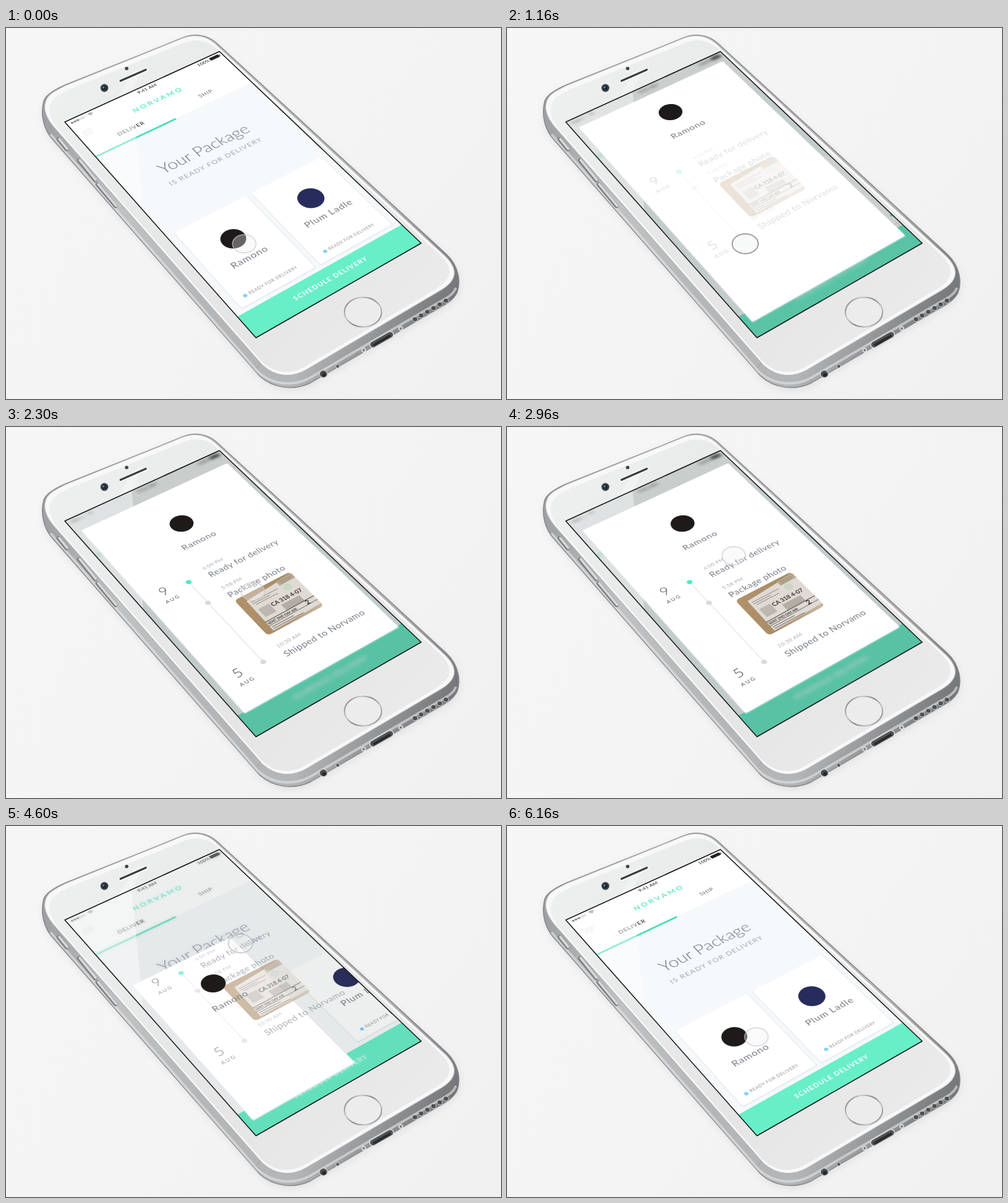
An HTML page for the animation above (6180 ms loop, 800 by 600 pixels).

```html
<!DOCTYPE html>
<html lang="en">
<head>
<meta charset="utf-8">
<title>Delivery app</title>
<style>
html, body { margin: 0; width: 100%; height: 100%; overflow: hidden; background: #f3f3f3; }
#stage { position: relative; width: 800px; height: 600px; overflow: hidden; }
#stage > svg { position: absolute; left: 0; top: 0; }
#screen { position: absolute; left: 0; top: 0; width: 375px; height: 667px; overflow: hidden; transform-origin: 0 0; background: #fff; }
#screen svg { display: block; }
#haze { filter: blur(4px); }
text { font-family: Lato, "Open Sans", sans-serif; white-space: pre; }
</style>
</head>
<body>
<div id="stage">
  <svg id="phone" width="800" height="600" viewBox="0 0 800 600"></svg>
  <div id="screen"><svg id="ui" width="375" height="667" viewBox="0 0 375 667"></svg></div>
  <svg id="top" width="800" height="600" viewBox="0 0 800 600"></svg>
</div>
<script>
const LOOP = 6180, STEP = 20, W = 375, H = 667;
const CORNERS = [[95, 152], [345, 38], [671, 348], [404, 501]];
const $ = id => document.getElementById(id);
const clamp = v => Math.min(1, Math.max(0, v));
const mix = (a, b, p) => a + (b - a) * p;
const ramp = (t, from, len) => clamp((t - from) / len);
const range = n => [...Array(n).keys()];

// ---------- markup helpers ----------
const rect = (x, y, w, h, fill, more = '') =>
  `<rect x="${x}" y="${y}" width="${w}" height="${h}" fill="${fill}" ${more}/>`;
const dot = (x, y, r, fill, more = '') =>
  `<circle cx="${x}" cy="${y}" r="${r}" fill="${fill}" ${more}/>`;
const line = (x1, y1, x2, y2, color, width, more = '') =>
  `<path d="M${x1} ${y1}L${x2} ${y2}" stroke="${color}" stroke-width="${width}" fill="none" ${more}/>`;
// y is the middle of the capitals
const label = (x, y, size, fill, str, { ls = 0, at = 'middle', wt = 400 } = {}) =>
  `<text x="${at === 'middle' ? x + ls / 2 : x}" y="${y + size * .36}" font-size="${size}" fill="${fill}" ` +
  `letter-spacing="${ls}" text-anchor="${at}" font-weight="${wt}">${str}</text>`;
const gradient = (id, x1, y1, x2, y2, ...stops) =>
  `<linearGradient id="${id}" gradientUnits="userSpaceOnUse" x1="${x1}" y1="${y1}" x2="${x2}" y2="${y2}">` +
  stops.map((c, i) => `<stop offset="${i / (stops.length - 1)}" stop-color="${c}"/>`).join('') + '</linearGradient>';

// ---------- phone body ----------
const BODY = 'M61 118C65 107 80 99 96 92L285 16C305 8 325 11 340 24L712 366C733 386 735 412 729 428C723 440 712 446 700 453L492 574C465 587 432 583 410 563L76 181C61 165 55 140 61 118Z';
const FACE = 'M65 116C69 106 82 100 96 93L285 16.500C305 9 323 12 338 25L709 368C733 391 728 409 703 424L485 553C460 567 435 564 414 545L77 160C62 142 60 127 65 116Z';

function drawPhone() {
  const cap = 'stroke-linecap="round"';
  const button = (x1, y1, x2, y2) =>
    line(x1, y1, x2, y2, '#7b7d80', 6.5, cap) + line(x1 + 1, y1 - .5, x2 + 1, y2 - .5, '#d6d8da', 3.8, cap);
  const holes = range(6).map(i =>
    `<ellipse cx="${661 + i * 10}" cy="${471 - i * 6}" rx="4.200" ry="3.800" fill="#4d4f52" stroke="#d3d4d6"/>`).join('');
  const screw = (x, y) => dot(x, y, 3.4, '#b6b8ba', 'stroke="#eee"') + dot(x, y, 1.4, '#67696c');

  $('phone').innerHTML = `<defs>
    ${gradient('wall', 0, 0, 800, 600, '#f6f6f6', '#f4f4f4', '#f0f0f0')}
    ${gradient('metal', 60, 120, 730, 470, '#9b9da0', '#bfc1c3', '#b4b6b8', '#b3b5b7', '#6b6d70')}
    ${gradient('bezel', 100, 60, 650, 520, '#eeefef', '#e7e8e8', '#e5e5e6', '#ebebeb')}
    ${gradient('ring', 548, 440, 606, 480, '#77797b', '#c9cacb', '#85878a', '#c4c5c6', '#7d7f82')}
    <filter id="soft" x="-20%" y="-20%" width="140%" height="140%"><feGaussianBlur stdDeviation="6"/></filter></defs>
    ${rect(0, 0, 800, 600, 'url(#wall)')}
    <path d="${BODY}" fill="#77797c" opacity=".15" transform="translate(1 4)" filter="url(#soft)"/>
    <path d="${BODY}" fill="url(#metal)" stroke="#85878a" stroke-width="1.400"/>
    <path d="M72 172L407 556C433 579 466 579 491 566L699 444C714 436 724 430 727 420" fill="none" stroke="#e6e7e8" stroke-width="4" opacity=".6"/>
    ${button(85, 180, 98, 196)}${button(118, 214, 144, 246)}${button(148, 253, 177, 288)}
    ${line(66, 147, 73, 155, '#9fa1a4', 2)}${line(405, 550, 411, 542, '#a9abad', 2)}
    <path d="${FACE}" fill="#f8f8f8" stroke="#b3b5b7" stroke-width="1.200"/>
    <path d="${FACE}" fill="url(#bezel)" transform="translate(396 290) scale(.976) translate(-396 -289)"/>
    <path d="M181 113L204 102L222 64L205 71Z" fill="#fff" opacity=".28"/>
    ${line(185, 86, 226, 68, '#fff', 5.5, cap)}${line(185, 85.5, 226, 67.500, '#3b3c3e', 3.2, cap)}
    ${dot(195, 65.5, 2.8, '#404247')}
    ${dot(159, 97, 6.4, '#42464b')}${dot(159, 97, 4, '#1b2936')}${dot(157.6, 96, 1.6, '#5d86ad')}
    <ellipse cx="577" cy="459.500" rx="30" ry="24" fill="#ececec" stroke="url(#ring)" stroke-width="2.200"/>
    <ellipse cx="513" cy="559.500" rx="6.500" ry="6" fill="#4a4c4f" stroke="#d4d5d6" stroke-width="1.200"/>
    ${dot(514, 561, 3, '#26272a')}${dot(536, 547, 3, '#55575a', 'stroke="#d2d3d4"')}
    ${screw(578, 521)}${screw(638, 486)}
    ${line(593, 512, 621, 496, '#dcddde', 12, cap)}${line(593, 512, 621, 496, '#505255', 9, cap)}
    ${line(595, 512.5, 620, 498, '#2a2b2d', 4, cap)}${holes}`;
}

// ---------- app screens ----------
const INK = '#777c86', PALE = '#a6aab3', TEAL = '#62eac5';
const NAME = { ls: 1.1 };
const READY = { ls: .8, at: 'start' };
const ready = x => dot(x, 579, 4, '#86d3ef') + label(x + 8.5, 579, 9, '#8b8f98', 'READY FOR DELIVERY', READY);

function statusBar() {
  const signal = range(5).map(i =>
    dot(11 + i * 6.5, 10.5, 2.5, i < 3 ? '#333' : 'none', 'stroke="#333" stroke-width=".700"')).join('');
  const wifi = [2, 5, 8].map(r =>
    `<path d="M${54 - r * .7} ${14 - r * .7}A${r} ${r} 0 0 1 ${54 + r * .7} ${14 - r * .7}" stroke="#333" stroke-width="1.700" fill="none"/>`).join('');
  return signal + wifi + label(187, 10.5, 12, '#222', '9:41 AM') +
    label(327, 10.5, 12, '#222', '100%') + rect(344, 5.5, 23, 9, '#222', 'rx="1.500"') + rect(368, 8, 1.8, 4, '#222');
}

function photo() {
  const g = '#8e8880';
  const rows = [[176, 400, 62], [176, 405, 40], [180, 410, 52], [250, 387, 30], [252, 392, 25]]
    .map(([x, y, w]) => rect(x, y, w, 2, g, 'opacity=".700"')).join('');
  return `<g id="photo" clip-path="url(#frame)">
    ${rect(153, 378, 131, 110, 'url(#card)')}
    <path d="M171 393L284 383V480L169 484Z" fill="#dfdad4"/>
    <path d="M246 384L284 382V396L246 397Z" fill="#b9a88e"/>
    ${rows}${dot(257, 408, 9, '#cbd6c6')}
    ${rect(177, 423, 25, 25, '#bdb7af')}${rect(219, 439, 43, 17, '#b3ada5')}
    ${label(239, 430, 12.5, '#37332f', 'CA 318 4-07', { wt: 700 })}
    ${line(169, 458, 284, 456, '#4a4540', 1.6)}${line(169, 470, 284, 468, '#4a4540', 1.2)}
    ${label(204, 464, 7.500, '#37332f', 'SENT 2ND DAY AIR', { wt: 700 })}
    ${label(264, 463, 15, '#2f2b28', '2', { wt: 700 })}
    ${rect(172, 474, 50, 2, g)}${rect(172, 479, 70, 2, g)}</g>`;
}

const START = { at: 'start', ls: .75 };
const time = (y, s) => label(151, y, 11.5, PALE, s, { at: 'start', ls: .5 });
const item = (y, s) => label(151, y, 19, INK, s, START);
// every row is moved on its own; the number is its resting height
const ROWS = [
  [285, label(57, 280, 29, '#3c4049', '9', { wt: 300 }) + label(59, 307, 11.5, '#565a63', 'AUG', { ls: 2.5 })],
  [287, dot(109, 287, 5.5, '#48ebc6')],
  [292, time(273, '6:00 PM') + item(295, 'Ready for delivery')],
  [354, dot(109, 354, 5.5, '#d7d9e1')],
  [365, time(338, '5:58 PM') + item(361, 'Package photo')],
  [395, photo()],
  [535, dot(109, 535, 5.5, '#d9dade')],
  [542, time(520, '10:30 AM') + item(544, 'Shipped to Norvamo')],
  [540, label(56, 530, 29, '#3c4049', '5', { wt: 300 }) + label(58, 556, 11.5, '#565a63', 'AUG', { ls: 2.5 })],
];

function drawApp() {
  const menu = range(3).map(i => line(12, 46 + i * 6, 36 - i * 2, 46 + i * 6, '#d7dae0', 1.8)).join('');
  $('ui').innerHTML = `<defs>
    ${gradient('card', 153, 378, 284, 488, '#b2916a', '#a88d6a', '#c9b8a1')}
    <clipPath id="frame">${rect(153, 378, 131, 110, '#000', 'rx="8"')}</clipPath></defs>
    ${rect(0, 0, W, H, '#f6f9fb')}${rect(0, 0, W, 121, '#fff')}${rect(0, 121, W, 1, '#eef1f3')}
    ${rect(0, 610, W, 57, '#68efc8')}
    <g id="sharp"><g id="base">
      ${statusBar()}${menu}
      ${label(186, 52, 17, TEAL, 'NORVAMO', { ls: 4.4, wt: 700 })}
      ${label(98, 93, 13.5, '#595e68', 'DELIVER', { ls: 1, wt: 700 })}
      ${label(277, 93, 13.5, '#6c717a', 'SHIP', { ls: 1 })}
      ${rect(0, 119, 187, 4.5, '#47dcb6')}
      ${label(186, 226, 36.5, '#6b7783', 'Your Package', { wt: 300 })}
      ${label(185, 268, 16, '#a2a7b0', 'IS READY FOR DELIVERY', { ls: 1.65 })}
      ${label(187, 636, 14, '#fff', 'SCHEDULE DELIVERY', { ls: 1.5, wt: 700 })}
    </g></g>
    <use id="haze" href="#base"/>
    <g id="next">
      ${rect(190, 379, 172, 223, '#e9edf0', 'rx="3"')}${rect(192, 379, 168, 220, '#fff', 'rx="3"')}
      ${dot(277, 456, 26, '#272c5c')}${label(280, 507, 20, INK, 'Plum Ladle', { ls: 1.4 })}${ready(218)}
    </g>
    ${rect(0, 0, W, H, '#2f423f', 'id="dim"')}
    <rect id="edge" fill="#e6eaed" rx="4"/><rect id="sheet" fill="#fff" rx="4"/>
    <g id="tag">${ready(38.5)}</g>
    <g id="list"><path id="rail" stroke="#e4e6eb" stroke-width="1.800"/>
      ${ROWS.map((r, i) => `<g id="row${i}">${r[1]}</g>`).join('')}</g>
    <g id="mark">${dot(0, 0, 24, '#1d1a19')}</g>
    <g id="name">${label(0, 0, 20, INK, 'Ramono', NAME)}</g>`;
}

function placeScreen() {
  const [[x0, y0], [x1, y1], [x2, y2], [x3, y3]] = CORNERS;
  const ax = x1 - x2, bx = x3 - x2, sx = x0 - x1 + x2 - x3;
  const ay = y1 - y2, by = y3 - y2, sy = y0 - y1 + y2 - y3;
  const det = ax * by - bx * ay;
  const g = (sx * by - bx * sy) / det, h = (ax * sy - sx * ay) / det;
  const col = (x, y, k, n) => [(x - x0 + k * x) / n, (y - y0 + k * y) / n, 0, k / n];
  const m = [...col(x1, y1, g, W), ...col(x3, y3, h, H), 0, 0, 1, 0, x0, y0, 0, 1];
  $('screen').style.transform = `matrix3d(${m.map(v => v.toFixed(9)).join()})`;
}

function drawTop() {
  $('top').innerHTML = `
    <path d="M95 152L203 103L222 295Z" fill="#fff" opacity=".42"/>
    <path d="M${CORNERS.map(p => p.join(' ')).join('L')}Z" fill="none" stroke="#17191a" stroke-width="1.600" stroke-linejoin="round"/>
    <ellipse id="touch"/>`;
}

// ---------- motion ----------
function spring(t, from, w, z) {
  const s = Math.max(0, t - from) / 1000;
  return 1 - Math.exp(-z * w * s) * (Math.cos(w * s) + z * Math.sin(w * s));
}
const OPEN = 1000;
const swing = (t, from, w, z, back) => t < back ? spring(t, from, w, z) : 1 - spring(t, back, 14, .73);

const PATH = [[1440, 385, 349], [2300, 399, 266], [3740, 328, 140], [4080, 301, 112], [4420, 301, 112],
  [4600, 379, 190], [4720, 397, 212], [6160, 403, 341]];

function touchAt(t) {
  const i = PATH.findIndex(p => p[0] > t);
  if (i === 0) return PATH[0].slice(1);
  if (i < 0) return PATH[PATH.length - 1].slice(1);
  const a = PATH[i - 1], b = PATH[i], p = (t - a[0]) / (b[0] - a[0]);
  return [mix(a[1], b[1], p), mix(a[2], b[2], p)];
}

const set = (id, attrs) => { for (const k in attrs) $(id).setAttribute(k, attrs[k]); };

function render(t) {
  const pos = swing(t, OPEN, 14, 1.1, 4502);
  const grow = swing(t, OPEN, 21, .72, 4524);
  const head = swing(t, OPEN, 21, .61, 4514);
  const push = swing(t, OPEN, 10, .73, 4514);
  const fan = swing(t, 1079, 14, .73, 4541);
  const shade = clamp(pos);

  const w = mix(163, 351.5, pos), h = mix(220, 570, grow);
  const x = mix(17, 13.5, pos), y = mix(489, 328, pos) - h / 2;
  set('sheet', { x, y, width: w, height: h });
  set('edge', { x: x - 1.5, y, width: w + 3, height: h + 2.5, opacity: 1 - shade * .6 });
  set('dim', { opacity: .26 * shade });
  set('sharp', { opacity: 1 - shade });
  set('haze', { opacity: shade });
  set('next', { transform: `translate(${200 * push} 0)` });
  set('tag', { opacity: clamp(1 - pos * 5) });

  // the heading overshoots upwards only
  const side = clamp(head * 1.2);
  set('mark', { transform: `translate(${mix(98, 187, side)} ${mix(455, 142, head)})` });
  set('name', { transform: `translate(${mix(96, 188, side)} ${mix(509, 203, head)})` });

  const alpha = t < 4500 ? ramp(t, 1120, 160) : 1 - ramp(t, 4540, 150);
  const shift = rest => -.4 * (1 - fan) * (rest - 89);
  set('list', { opacity: alpha });
  ROWS.forEach((r, i) => set('row' + i, { transform: `translate(0 ${shift(r[0])})` }));
  set('rail', { d: `M109 ${287 + shift(287)}V${535 + shift(535)}` });

  const press = Math.max(ramp(t, OPEN, 120) * (1 - ramp(t, 1200, 220)),
    .3 * ramp(t, 4380, 80) * (1 - ramp(t, 4620, 160)));
  const [cx, cy] = touchAt(t), tone = Math.round(mix(200, 160, press));
  set('touch', {
    cx, cy, rx: 19 + 2 * press, ry: 14.8 + 1.2 * press,
    fill: `rgba(240,241,242,${.35 + .1 * press})`,
    stroke: `rgba(${tone},${tone},${tone + 3},${.75 + .25 * press})`,
    'stroke-width': 1.5 + .5 * press
  });
}

drawPhone();
drawApp();
placeScreen();
drawTop();
const began = performance.now();
function tick() {
  const t = (performance.now() - began) % LOOP;
  render(Math.floor(t / STEP) * STEP);
  requestAnimationFrame(tick);
}
render(0);
requestAnimationFrame(tick);
</script>
</body>
</html>
```
